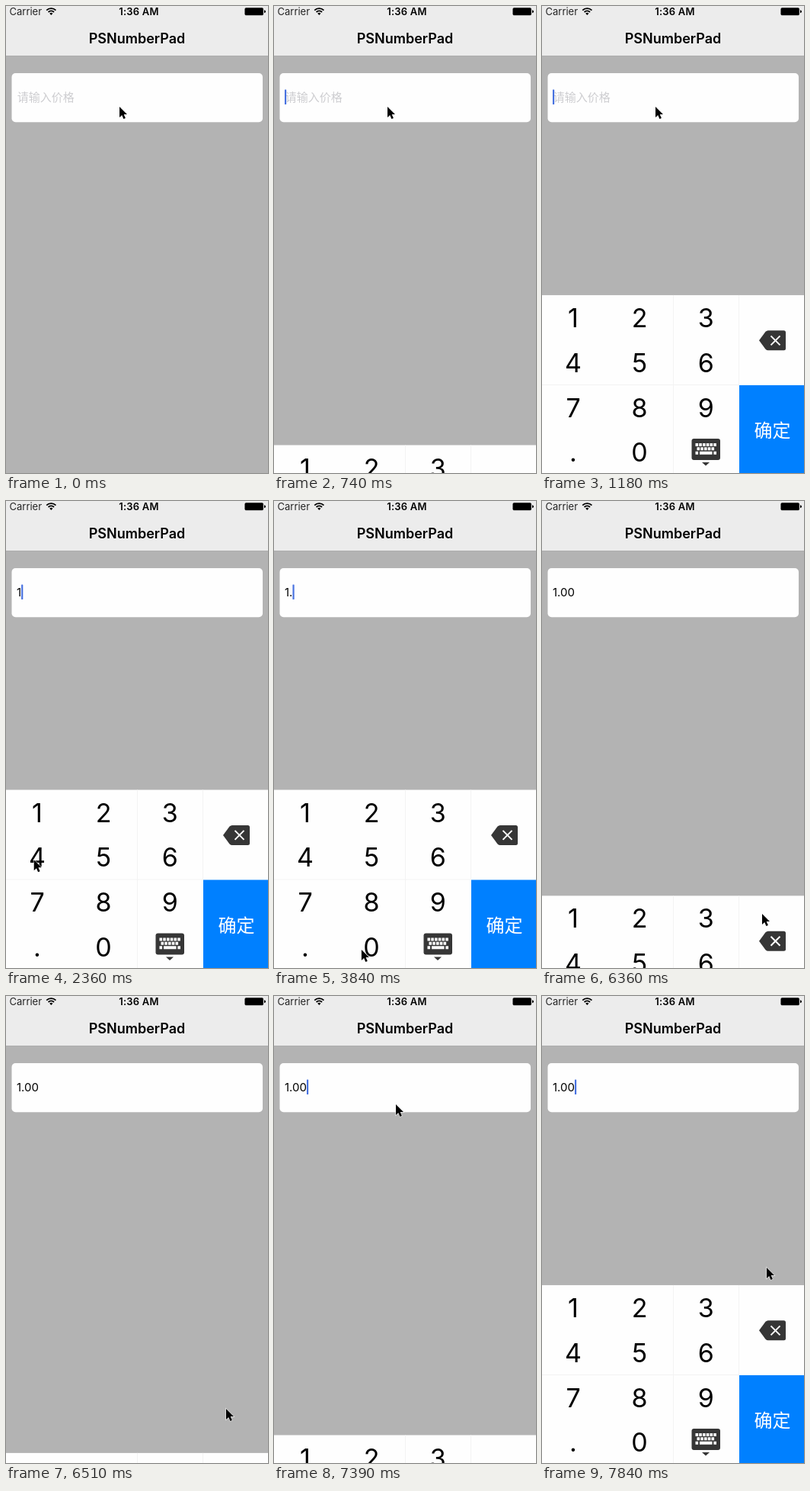
Recreate the animation shown at these times as an HTML page. Size 344x612 px, loop 7990 ms.

```html
<!DOCTYPE html>
<html lang="zh">
<head>
<meta charset="utf-8">
<title>PSNumberPad</title>
<style>
  html, body { margin: 0; width: 100%; height: 100%; overflow: hidden; background: #b3b3b3; }
  svg { display: block; width: 100vw; height: 100vh; }
  text { font-family: Inter, "Noto Sans CJK SC", "Noto Sans CJK", sans-serif; fill: #000; }
  .mid { text-anchor: middle; }
  .key { font-size: 34px; }
  .status { font-size: 13px; }
  .bold { font-weight: 600; }
  .cjk { font-family: "Noto Sans CJK SC", "Noto Sans CJK", sans-serif; }
</style>
</head>
<body>
<svg viewBox="0 0 344 612">
  <rect width="344" height="612" fill="#b3b3b3"/>

  <rect width="344" height="65" fill="#ececec"/>
  <rect y="65" width="344" height="1" fill="#adadad"/>
  <text class="status" x="4.5" y="12" fill-opacity=".85">Carrier</text>
  <g fill="none" stroke="#000" stroke-width="1.8">
    <path d="M53.2 5.6a8.6 8.6 0 0 1 12.2 0M55.6 8a5.2 5.2 0 0 1 7.4 0"/>
    <path d="M59.3 12l-2.1-2.2a3 3 0 0 1 4.2 0z" fill="#000" stroke="none"/>
  </g>
  <text class="status bold mid" x="174.5" y="12" letter-spacing=".2">1:36 AM</text>
  <rect x="313.7" y="2.5" width="24" height="9.5" rx="1.5" stroke="#000" stroke-opacity=".4"/>
  <path d="M339 5.3q2 .4 2 2t-2 2z"/>
  <text class="bold mid" x="172" y="48.5" font-size="18">PSNumberPad</text>

  <rect x="7.5" y="88" width="329.5" height="64.3" rx="5" fill="#fefefe"/>
  <text id="hint" class="cjk" x="14.7" y="125" font-size="15" font-weight="300" style="fill:#cdcdd0">请输入价格</text>
  <text id="value" x="14" y="125.3" font-size="15"></text>
  <rect id="caret" y="109.5" width="2.2" height="19.5" rx=".6" fill="#4872e0"/>

  <g id="pad">
    <rect width="344" height="234" fill="#fefefe"/>
    <path d="M172.5 0V234M258.5 0V118M0 117.5H259" stroke="#f3f3f3"/>
    <g id="keys"></g>
    <path d="M285 59.4L293.5 47.9Q295 46.4 297 46.4H317.5Q320 46.4 320 48.9V69.9Q320 72.4 317.5 72.4H297Q295 72.4 293.5 70.9Z" fill="#363636"/>
    <path d="M300.5 53.4l12 12m0-12l-12 12" stroke="#fff" stroke-width="2"/>
    <rect x="259" y="118" width="85" height="116" fill="#0080ff"/>
    <text class="cjk mid" x="302.5" y="186" font-size="24" style="fill:#fff">确定</text>
    <rect x="196.5" y="188" width="37.5" height="28" rx="3" fill="#363636"/>
    <path d="M201.5 196H229M203.5 201.3H227" stroke="#fff" stroke-width="4" stroke-dasharray="3.6 1.15"/>
    <path d="M201.5 206.8H205.1M207 206.8H223.5M225.4 206.8H229" stroke="#fff" stroke-width="4"/>
    <path d="M210 219H220L215 223.6Z" fill="#363636"/>
  </g>

  <path id="mouse" d="M0 0V14L3.2 11L5.4 16L7.9 14.9L5.7 10.1H10Z" stroke="#fff" stroke-width="1.2" stroke-opacity=".8" paint-order="stroke"/>
</svg>

<script>
const $ = id => document.getElementById(id);
const LOOP = 7990, STEPS = 54;
const OPEN = 378.5, SHUT = 612;

// All times below are in steps of the screen refresh.
const home = [149, 132];
const moves = [ // start, end, x, y
  [8, 13, 36, 404], [15, 20, 38, 588], [23, 27, 120, 588], [32, 38, 188, 556],
  [38, 42, 289, 541], [44, 47, 199, 104], [47, 48, 160, 142], [50, 53, 295, 356]
];
const typed = { 15: '1', 23: '1.', 27: '1.0', 29: '1.00' };
const focusAt = [4.73, 49.73], blurAt = 42.23;

['123', '456', '789', '.0'].forEach((row, r) => [...row].forEach((key, c) => {
  const t = document.createElementNS('http://www.w3.org/2000/svg', 'text');
  t.setAttribute('class', 'key mid');
  t.setAttribute('x', 41 + 87.1 * c);
  t.setAttribute('y', 42.1 + 58.8 * r);
  t.textContent = key;
  $('keys').append(t);
}));

const easeOut = u => 1 - (1 - u) ** 2;

// Critically damped spring from 0 to 1.
function spring(t) {
  const x = 2.6 * Math.max(0, t);
  return 1 - (1 + x) * Math.exp(-x);
}

function mouseAt(n) {
  return moves.reduce(([x, y], [from, to, tx, ty]) => {
    const k = easeOut(Math.min(1, Math.max(0, (n - from) / (to - from))));
    return [x + (tx - x) * k, y + (ty - y) * k];
  }, home);
}

function padTop(n) {
  const shown = spring(n - focusAt[0]) - spring(n - blurAt) + spring(n - focusAt[1]);
  return SHUT + (OPEN - SHUT) * shown;
}

function draw(now) {
  const n = Math.min(STEPS - 1, Math.floor(now % LOOP / LOOP * STEPS + .1));
  const lastKey = Math.max(0, ...Object.keys(typed).filter(k => k <= n));
  const text = typed[lastKey] || '';
  const lastFocus = Math.max(0, ...focusAt.filter(f => f <= n));
  const focused = lastFocus && (n < blurAt || lastFocus > blurAt);
  const idle = n - Math.max(lastKey, Math.ceil(lastFocus));

  $('value').textContent = text;
  $('hint').style.display = text ? 'none' : '';
  $('caret').setAttribute('x', 14 + (text && $('value').getComputedTextLength()));
  $('caret').style.display = focused && idle % 8 < 4 ? '' : 'none';

  $('pad').setAttribute('transform', `translate(0 ${padTop(n)})`);
  $('mouse').setAttribute('transform', `translate(${mouseAt(n)})`);
}

const start = performance.now();
function tick() {
  draw(performance.now() - start);
  requestAnimationFrame(tick);
}
tick();
</script>
</body>
</html>
```
